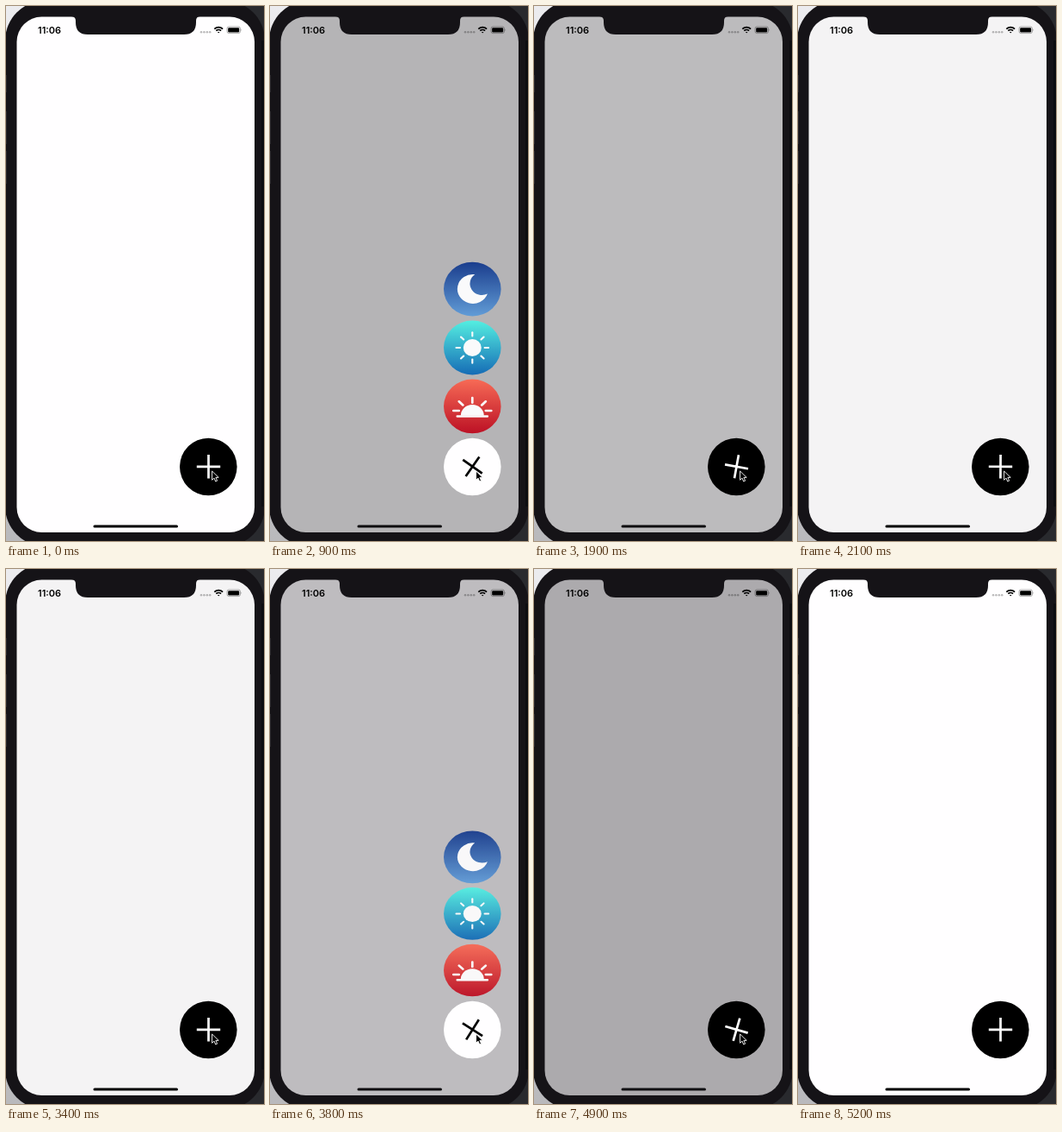
Write an HTML page that moves like this. It is 300 by 620 pixels and loops after 6.2 s.

```html
<!DOCTYPE html>
<html lang="en">
<head>
<meta charset="utf-8">
<title>Floating action menu</title>
<style>
  html, body { margin: 0; width: 100%; height: 100%; overflow: hidden; background: #151317; }
  svg { display: block; width: 300px; height: 620px; }
  .time { font: 600 11px Inter, Arial, sans-serif; }
  .line { fill: none; stroke: #fff; stroke-linecap: round; }
</style>
</head>
<body>
<svg viewBox="0 0 300 620">
  <defs>
    <linearGradient id="desk" x2="0" y2="1">
      <stop offset="0" stop-color="#ececef"/><stop offset="1" stop-color="#b9b9bc"/>
    </linearGradient>
    <linearGradient id="night" x2="0" y2="1">
      <stop offset="0" stop-color="#12378b"/><stop offset="1" stop-color="#5d9bd9"/>
    </linearGradient>
    <linearGradient id="day" x2="0" y2="1">
      <stop offset="0" stop-color="#4ff2e4"/><stop offset="1" stop-color="#0d68b6"/>
    </linearGradient>
    <linearGradient id="dawn" x2="0" y2="1">
      <stop offset="0" stop-color="#fb6751"/><stop offset="1" stop-color="#bd081d"/>
    </linearGradient>
  </defs>

  <!-- phone body -->
  <rect width="150" height="620" fill="url(#desk)"/>
  <rect x="150" width="150" height="620" fill="#292a2e"/>
  <rect x="-1" y="-6" width="302" height="632" rx="46" fill="#151317"/>
  <path d="M298.5 40V580" stroke="#0c0d10" stroke-width="3"/>
  <path d="M.5 80v20M.5 122v38M.5 168v38" stroke="#2b292d"/>

  <!-- screen -->
  <rect id="screen" x="12.5" y="12.5" width="276.5" height="597.5" rx="29"/>
  <path d="M76 12h149.500q-4.500 .5-4.500 5v2q0 14-14 14H95q-14 0-14-14v-2q0-4.500-5-5z" fill="#151317"/>
  <text class="time" x="37" y="31.700">11:06</text>
  <g fill="#000" fill-opacity=".27">
    <circle cx="227" cy="30.300" r="1.250"/><circle cx="230.400" cy="30.300" r="1.250"/>
    <circle cx="233.800" cy="30.300" r="1.250"/><circle cx="237.200" cy="30.300" r="1.250"/>
  </g>
  <g fill="none" stroke="#000" stroke-width="1.700">
    <path d="M242.300 26.700a7 7 0 0 1 9.800 0M244.300 28.700a4.200 4.200 0 0 1 5.800 0"/>
    <path d="M245.900 29.900h2.600l-1.300 1.500z" fill="#000" stroke="none"/>
  </g>
  <rect x="257" y="24" width="15.500" height="7.600" rx="2.200" fill="none" stroke="#000" stroke-opacity=".4" stroke-width=".8"/>
  <rect x="258.200" y="25.200" width="13" height="5.200" rx="1.200"/>
  <path d="M273.500 26.500q1.200 1.300 0 2.600z" fill-opacity=".45"/>
  <rect id="home" x="101.500" y="601.500" width="98.500" height="3" rx="1.500"/>

  <!-- menu -->
  <g id="stack">
    <g transform="translate(235.300 318)">
      <circle r="33.300" fill="url(#night)"/>
      <path d="M3-18A18 18 0 1 0 17.600 5.800A14 14 0 0 1 3-18z" fill="#fff"/>
    </g>
    <g transform="translate(235.300 390)">
      <circle r="33.300" fill="url(#day)"/>
      <circle r="10.500" fill="#fff"/>
      <g id="rays" class="line" stroke-width="2.100"></g>
    </g>
    <g transform="translate(235.300 462)">
      <circle r="33.300" fill="url(#dawn)"/>
      <path d="M-13.500 11.500a13.500 13.500 0 0 1 27 0z" fill="#fff"/>
      <path class="line" stroke-width="2.700"
        d="M-17.500 12.300h35M-22-.0M-22 5.500h6.500M15.500 5.500h6.500M-15.500-6l4.500 4.500M15.500-6l-4.500 4.500M0-10.500v6"/>
    </g>
  </g>

  <!-- main button -->
  <circle id="disc" cx="235.300" cy="534" r="33.300"/>
  <path id="plus" d="M-13.700 0h27.400M0-13.700v27.400" stroke-width="2.700"/>
  <path id="cursor" d="M239.600 539v10.300l2.400-2.200 1.700 3.900 1.900-.8-1.700-3.800h3.300z"
    fill="#000" stroke="#fff" stroke-width=".9"/>
</svg>
<script>
const LOOP = 6200, STEP = 100, OPEN_MS = 585, CLOSE_MS = 500, BASE = 495.4;
const runs = [{ open: 590, close: 1640 }, { open: 3525, close: 4700 }];
const PAUSE = [2100, 3400];   // the first fade stops just short of white
const CURSOR_GONE = 5200;
const $ = id => document.getElementById(id);
const clamp = v => Math.max(0, Math.min(1, v));
const easeOut = (x, power) => 1 - (1 - x) ** power;
const mix = (a, b, k) => `rgb(${a.map((v, i) => Math.round(v + (b[i] - v) * k))})`;

for (let a = 0; a < 360; a += 45) {
  $('rays').innerHTML += `<path d="M14.300 0h4.500" transform="rotate(${a})"/>`;
}

function pose(t) {
  const held = t >= PAUSE[0] && t < runs[1].open;
  const run = t < runs[1].open ? runs[0] : runs[1];
  const s = held ? PAUSE[0] : t;
  if (s < run.close) {
    const x = clamp((s - run.open) / OPEN_MS);
    return { open: x > 0, dim: x, turn: easeOut(x, 2), rise: easeOut(x, 3.8) };
  }
  const x = clamp((s - run.close) / CLOSE_MS);
  const settled = held && t >= PAUSE[1];
  return { open: false, dim: 1 - x, turn: settled ? 0 : 1 - easeOut(x, 2), rise: 0 };
}

function draw(t) {
  const { open, dim, turn, rise } = pose(t);
  $('screen').setAttribute('fill', mix([255, 254, 255], [116, 114, 118], dim));
  $('home').setAttribute('fill', mix([0, 0, 0], [29, 27, 31], dim));
  $('stack').setAttribute('visibility', open ? 'visible' : 'hidden');
  $('stack').setAttribute('opacity', rise);
  $('stack').setAttribute('transform', `translate(0 ${BASE * (1 - rise)}) scale(1 ${rise})`);
  $('disc').setAttribute('fill', open ? '#fffeff' : '#000');
  $('plus').setAttribute('stroke', open ? '#000' : '#fff');
  $('plus').setAttribute('transform', `translate(235.500 533.800) rotate(${45 * turn})`);
  $('cursor').setAttribute('visibility', t < CURSOR_GONE ? 'visible' : 'hidden');
}

const start = performance.now();
function tick() {
  const t = (performance.now() - start) % LOOP;
  draw(Math.floor(t / STEP) * STEP);
  requestAnimationFrame(tick);
}
tick();
</script>
</body>
</html>
```
